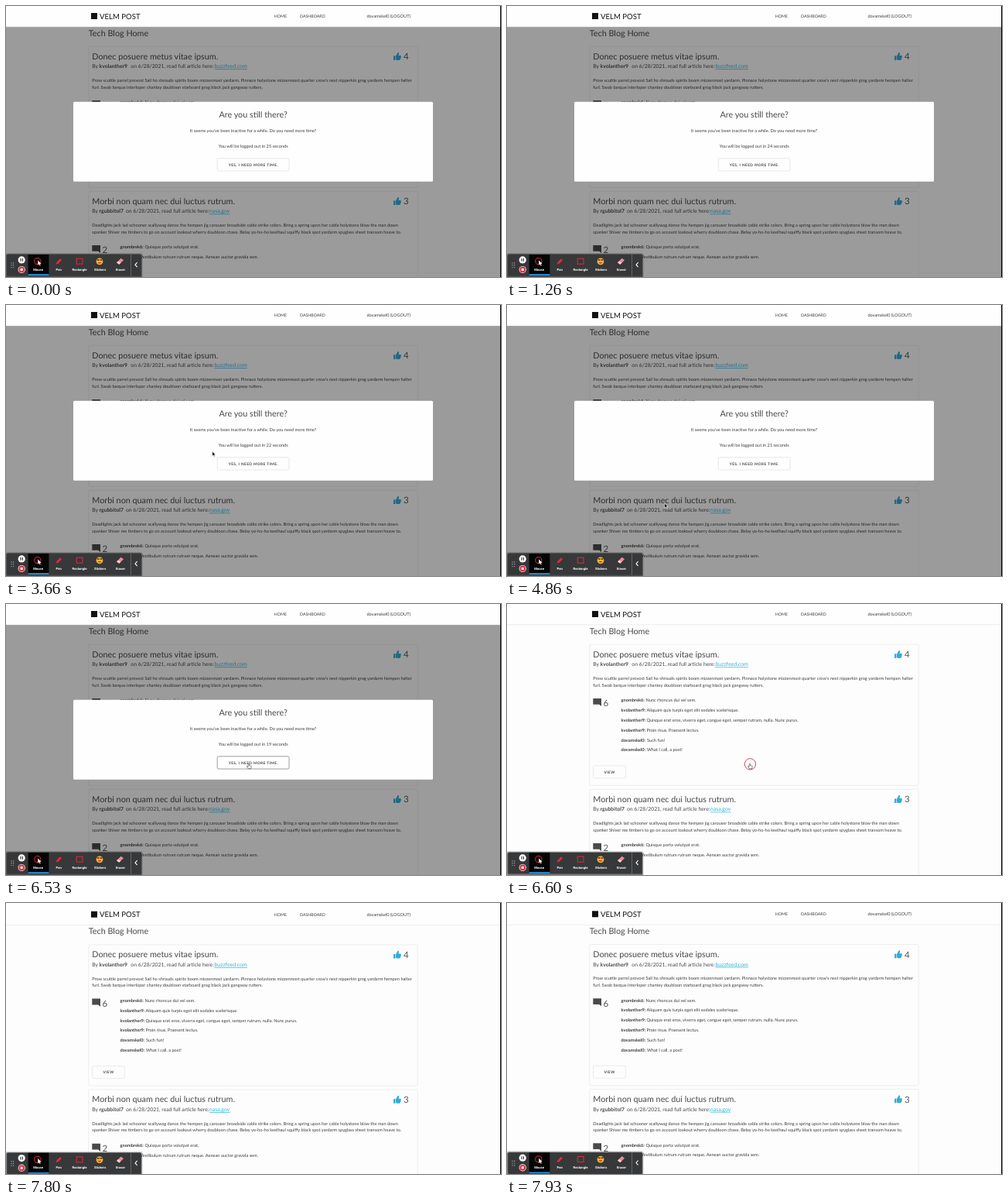
Write an HTML page that moves like this. It is 640 px wide and 350 px high and loops after 8000 ms.

```html
<!DOCTYPE html>
<html lang="en">
<head>
<meta charset="utf-8">
<title>Session timeout</title>
<style>
  html, body { margin: 0; width: 100%; height: 100%; overflow: hidden; background: #fdfdfd; }
  svg { display: block; width: 640px; height: 350px; }
  text { font-family: Lato, "Open Sans", sans-serif; font-size: 5.66px; fill: #3c3c3c; text-rendering: geometricPrecision; white-space: pre; }
  .h { font-size: 10.8px; fill: #484848; }
  .by { font-size: 6.8px; fill: #4a4a4a; }
  .b { font-weight: 700; }
  .link { font-size: 7px; fill: #2fb6e0; text-decoration: underline; }
  .num { font-size: 11.5px; fill: #555; }
  .nav { font-size: 5.25px; }
  .btn { font-size: 4.76px; font-weight: 700; letter-spacing: .43px; fill: #444; }
  .mid { text-anchor: middle; }
  .tool { font: 700 4.2px Roboto, "Open Sans", sans-serif; fill: #fff; text-anchor: middle; }
</style>
</head>
<body>
<svg id="stage" viewBox="0 0 640 350"></svg>
<script>
const LOOP = 8000, CLOSE = 6565, HOVER = 6230, SHOW = 2200, HIDE = 7800;
const stage = document.getElementById('stage');

const text = (x, y, s, cls = '') => `<text x="${x}" y="${y}" class="${cls}">${s}</text>`;
const rect = (x, y, w, h, attrs) => `<rect x="${x}" y="${y}" width="${w}" height="${h}" ${attrs}/>`;
const path = (d, attrs) => `<path d="${d}" ${attrs}/>`;
const circle = (x, y, r, attrs) => `<circle cx="${x}" cy="${y}" r="${r}" ${attrs}/>`;

const thumb = '<g fill="#35abd6" transform="translate(0 .7)">' + rect(501, 63.6, 2.4, 5.6, '') +
  path('M504 64 L506.6 59.3 Q508.4 59 508 61.2 L507.4 63.2 H510 Q511.3 63.6 510.6 65 Q510.9 66 510.3 66.6 Q510.5 67.6 509.7 68 Q509.5 69.2 508.3 69.2 H506 L504 68.6Z', '') + '</g>';
const bubble = path('M111.3 121.9 H122 V132 L119.2 129.7 H111.3Z', 'fill="#4a4a4a"');

function card(top, height, post) {
  const comments = post.comments.map(([who, x, words], i) => {
    const y = 126.3 + 12.8 * i;
    return (who ? text(147.5, y, who + ':', 'b') : '') + text(x, y, words);
  }).join('');
  return `<g transform="translate(0 ${top - 52})">` +
    rect(106.8, 52.2, 425.4, height, 'rx="1" fill="none" stroke="#e9e9e9" stroke-width=".7"') +
    text(111.3, 68.6, post.title, 'h') +
    text(111.3, 80.4, 'By', 'by') + text(120.6, 80.4, post.author, 'by b') +
    text(post.dateX, 80.4, 'on 6/28/2021, read full article here:', 'by') +
    text(post.linkX, 80.4, post.link, 'link') +
    thumb + text(513.9, 69.3, post.likes, 'num') +
    post.body.map((s, i) => text(111.3, 98.2 + 8.4 * i, s)).join('') +
    bubble + text(124.4, 132.4, post.comments.length, 'num') + comments + '</g>';
}

const posts = [{
  title: 'Donec posuere metus vitae ipsum.', author: 'kvolanther9', dateX: 161.3, link: 'buzzfeed.com', linkX: 269.4, likes: 4,
  body: ["Prow scuttle parrel provost Sail ho shrouds spirits boom mizzenmast yardarm. Pinnace holystone mizzenmast quarter crow's nest nipperkin grog yardarm hempen halter",
    'furl. Swab barque interloper chantey doubloon starboard grog black jack gangway rutters.'],
  comments: [
    ['gnombrek6', 179.4, 'Nunc rhoncus dui vel sem.'],
    ['kvolanther9', 180.4, 'Aliquam quis turpis eget elit sodales scelerisque.'],
    ['kvolanther9', 180.4, 'Quisque erat eros, viverra eget, congue eget, semper rutrum, nulla. Nunc purus.'],
    ['kvolanther9', 180.4, 'Proin risus. Praesent lectus.'],
    ['dovamskel0', 181, 'Such fun!'],
    ['dovamskel0', 181, 'What I call, a post!']]
}, {
  title: 'Morbi non quam nec dui luctus rutrum.', author: 'rgubbitol7', dateX: 154.9, link: 'nasa.gov', linkX: 262.8, likes: 3,
  body: ['Deadlights jack lad schooner scallywag dance the hempen jig carouser broadside cable strike colors. Bring a spring upon her cable holystone blow the man down',
    'spanker Shiver me timbers to go on account lookout wherry doubloon chase. Belay yo-ho-ho keelhaul squiffy black spot yardarm spyglass sheet transom heave to.'],
  comments: [
    ['gnombrek6', 179.4, 'Quisque porta volutpat erat.'],
    ['', 173.3, 'Vestibulum rutrum rutrum neque. Aenean auctor gravida sem.']]
}];

const content = text(106.8, 38.8, 'Tech Blog Home', 'h') +
  card(52, 182.2, posts[0]) + card(239.1, 200, posts[1]) +
  rect(111.6, 208.9, 41.8, 16, 'rx="1.6" fill="none" stroke="#ddd" stroke-width=".6"') +
  text(132.5, 218.6, 'VIEW', 'btn mid');

const header = rect(0, -10, 640, 37, 'fill="#fefefe"') +
  rect(0, 26.5, 640, .6, 'fill="#e4e4e4"') +
  rect(110, 9, 8, 8, 'fill="#111"') +
  `<text x="121" y="16.8" style="font-size:9.6px;fill:#111">VELM POST</text>` +
  text(346.8, 15, 'HOME', 'nav') + text(380, 15, 'DASHBOARD', 'nav') +
  `<text x="466.4" y="15" style="font-size:5.6px">dovamskel0 (LOGOUT)</text>`;

const modal = rect(87, 123.8, 465, 103, 'rx="1.5" fill="#fefefe"') +
  text(319.6, 144.3, 'Are you still there?', 'h mid') +
  text(319.6, 163.2, "It seems you've been inactive for a while. Do you need more time?", 'mid') +
  `<text id="count" x="319.7" y="182.8" class="mid"></text>` +
  rect(273.2, 196.8, 92.8, 16.2, 'id="more" rx="1.6" fill="none" stroke-width=".7"') +
  text(319.8, 206.6, 'YES, I NEED MORE TIME.', 'btn mid');

const arrow = 'M0 0 V6.2 L1.5 4.9 L2.5 7 L3.5 6.5 L2.6 4.5 H4.5Z';
const hand = 'M-.7 .6 Q0 -.4 .7 .6 V2.6 L3 3.2 Q3.6 3.5 3.4 4.4 L2.9 6.6 H-.5 L-2.4 4.1 Q-2.4 3.2 -1.6 3.5 L-.7 4.3Z';
const red = 'fill="none" stroke="#e2293c"';
const labels = [['Mouse', 41.6], ['Pen', 68.2], ['Rectangle', 95], ['Stickers', 121.6], ['Eraser', 148]];
const dots = [0, 1, 2].map(i => circle(7, 332 + 2.8 * i, .7, 'fill="#aaa"') + circle(9.6, 332 + 2.8 * i, .7, 'fill="#aaa"')).join('');

const toolbar = rect(-1, 319, 177.6, 34, 'rx="3" fill="#000" opacity=".15"') +
  rect(.2, 320.2, 175.4, 32, 'rx="2" fill="#000" opacity=".45"') +
  rect(1.2, 321, 173.6, 27.6, 'rx="1.6" fill="#37383a"') +
  rect(28.6, 321, 26.8, 27, 'fill="#050505"') + rect(28.6, 346.2, 26.8, 1.8, 'fill="#2196e8"') + dots +
  circle(20.2, 327.9, 4.6, 'fill="#fff"') + path('M19 326 V329.8 M21.4 326 V329.8', 'stroke="#333" stroke-width="1.1"') +
  circle(20.2, 340.5, 4.6, 'fill="#fff"') + circle(20.2, 340.5, 3.9, 'fill="#d93646"') + rect(18.7, 339, 3, 3, 'fill="#fff"') +
  circle(40.8, 329.6, 4.1, red + ' stroke-width="1"') +
  path(arrow, 'transform="translate(41.2 328.4)" fill="#fff"') +
  path('M64.6 333.6 L65.4 330.9 L70 326.3 L72 328.3 L67.4 332.9Z', 'fill="#e2293c"') +
  rect(91.2, 326.2, 7.8, 7, red + ' stroke-width="1"') +
  circle(121, 329.9, 4.4, 'fill="#f5b531"') +
  path('M117.8 328 H120.6 M121.6 328 H124.4', 'stroke="#473018" stroke-width="1.5"') +
  path('M118.4 331 Q121 334.6 123.6 331Z', 'fill="#c8323c"') +
  path('M143 331.4 L148.6 325.8 L152 328.2 L146.4 333.8Z', 'fill="#ee8b9b"') +
  path('M143 331.4 L145 329.4 L148.4 331.8 L146.4 333.8Z', 'fill="#f6ccd2"') +
  labels.map(([s, x]) => text(x, 341.8, s, 'tool')).join('') +
  rect(161.2, 321, .7, 27.6, 'fill="#77787a"') +
  path('M169.6 331.2 L167 334.2 L169.6 337.2', 'fill="none" stroke="#fff" stroke-width="1.1"');

stage.innerHTML = rect(0, 0, 640, 350, 'fill="#fdfdfd"') +
  `<g id="content">${content}</g>` +
  rect(0, 27, 640, 323, 'id="shade" fill="#000" opacity=".39"') +
  `<g id="header">${header}</g><g id="modal">${modal}</g><g id="toolbar">${toolbar}</g>` +
  circle(314.4, 206.8, 7.2, 'id="ring" fill="#fff" fill-opacity=".4" stroke="#c4455c" stroke-width="1"') +
  '<path id="cursor" stroke-width=".6" stroke-linejoin="round"/>' +
  rect(639, 0, 1, 350, 'fill="#000"');

const el = {};
for (const node of stage.querySelectorAll('[id]')) el[node.id] = node;
const set = (node, attrs) => { for (const k in attrs) node.setAttribute(k, attrs[k]); };
const ease = p => { p = Math.min(1, Math.max(0, p)); return p * p * (3 - 2 * p); };

// time, x, y of the pointer tip
const route = [[SHOW, 316, 141], [2450, 303.8, 149.4], [3000, 303.8, 149.4], [4600, 203.6, 256], [5500, 203.6, 256], [6300, 313.8, 206]];

function pointer(t) {
  let i = 0;
  while (i < route.length - 2 && t > route[i + 1][0]) i++;
  const [t0, x0, y0] = route[i], [t1, x1, y1] = route[i + 1];
  const p = ease((t - t0) / (t1 - t0));
  return [x0 + (x1 - x0) * p, y0 + (y1 - y0) * p];
}

// the whole window is pulled down, then springs back
const pull = t => 2.7 * ease((t - 7150) / 300) * (t > 7580 ? Math.exp((7580 - t) / 480) : 1);

function draw(t) {
  const open = t < CLOSE, over = t >= HOVER;
  el.modal.style.display = el.shade.style.display = open ? '' : 'none';
  el.count.textContent = `You will be logged out in ${25 - Math.floor(Math.max(0, t - 200) / 1000)} seconds`;
  set(el.more, { stroke: over ? '#777' : '#ddd' });

  const transform = `translate(0 ${pull(t).toFixed(2)})`;
  for (const part of [el.content, el.header, el.toolbar]) set(part, { transform });

  const [x, y] = pointer(t);
  set(el.cursor, {
    d: over ? hand : arrow,
    transform: `translate(${x} ${y})`,
    fill: over ? '#fff' : '#111',
    stroke: over ? '#333' : '#fff',
    visibility: t >= SHOW && t < HIDE ? 'visible' : 'hidden'
  });

  const age = (t - CLOSE) / 400;
  set(el.ring, { opacity: age < 0 || age > 1 ? 0 : 1 - ease(age) });
}

const start = performance.now();
function tick() {
  draw((performance.now() - start) % LOOP);
  requestAnimationFrame(tick);
}
draw(0);
requestAnimationFrame(tick);
</script>
</body>
</html>
```
